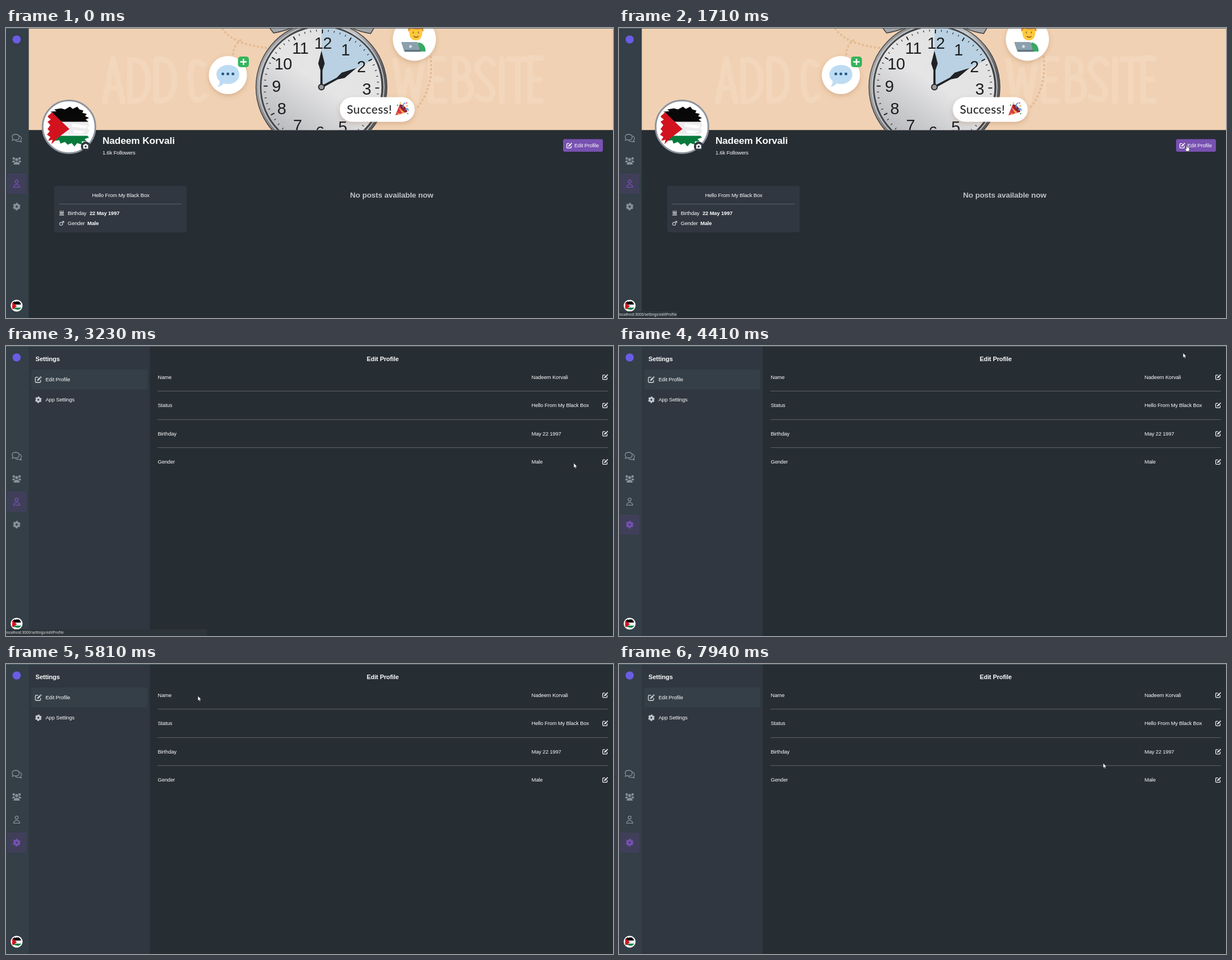
Write an HTML page that moves like this. It is 1082 px wide and 518 px high and loops after 7990 ms.

```html
<!DOCTYPE html>
<html lang="en">
<head>
<meta charset="utf-8">
<title>Edit profile</title>
<style>
  html, body { margin: 0; height: 100%; overflow: hidden; background: #262d33; }
  svg { display: block; width: 100vw; height: 100vh; }
  text { font: 9.4px "Liberation Sans", Arial, sans-serif; letter-spacing: -.13px; fill: #fbfcfc; }
  .bold { font-weight: 700; }
  .mid { text-anchor: middle; }
  .line { fill: none; stroke: currentColor; stroke-linecap: round; stroke-linejoin: round; }
  .solid { fill: currentColor; }
  .rule { stroke: #5c6268; }
  .nav { color: #87919a; }
  .active { color: #7852b5; }
</style>
</head>
<body>
<svg viewBox="0 0 1082 518">
  <defs>
    <clipPath id="bannerClip"><path d="M40 1H1082V182.300H40z"/></clipPath>
    <linearGradient id="metal" x2="1" y2=".35">
      <stop stop-color="#6b6d70"/><stop offset=".12" stop-color="#a7a9ab"/>
      <stop offset=".4" stop-color="#77797c"/><stop offset=".7" stop-color="#c3c4c6"/>
      <stop offset="1" stop-color="#58595c"/>
    </linearGradient>
    <linearGradient id="face" x1=".75" y1=".15" x2=".25" y2=".9">
      <stop stop-color="#e2e2e3"/><stop offset=".45" stop-color="#e5e5e6"/><stop offset="1" stop-color="#bcbdc0"/>
    </linearGradient>
    <filter id="shadow" x="-20%" y="-20%" width="140%" height="150%">
      <feDropShadow dx="0" dy="3" stdDeviation="4" flood-color="#8a5a30" flood-opacity=".28"/>
    </filter>
    <g id="flag">
      <circle r="47" fill="#fff"/>
      <path fill="#ececee" d="M-10-9H33L37-3 33 2 37 7 33 13H-10z"/>
      <path fill="#fff" d="M5-6 33-2 30 3 6 0zM8 6 30 8 22 12 9 11z"/>
      <path fill="#080808" d="M-32-19-37-20-28-25-33-27-22-28-26-31-14-33-7-31 2-36 7-32 15-36 19-31 26-29 24-25 32-23 29-19 36-16 30-13 35-9H-16z"/>
      <path fill="#087a3c" d="M-26 16H33L36 19 28 22 32 26 23 26 24 32 15 29 10 35 5 29-2 32-7 27-15 30-17 24-27 25z"/>
      <path fill="#d3121f" d="M-30-26 1 4-20 20-31 31-29 23-37 25-33 18-39 14-34 8-38 4-33-3-38-9-32-13-38-18z"/>
    </g>
    <g id="edit">
      <path class="line" stroke-width="1.900" d="M-1-5.200H-4.400A2 2 0 0 0-6.400-3.200V4.400A2 2 0 0 0-4.400 6.400H3.200A2 2 0 0 0 5.200 4.400V1.500"/>
      <path class="solid" d="M-2.800 3-2-.3 3-5.300 5.500-2.800.5 2.200zM3.800-6 4.800-7Q5.500-7.500 6.200-6.900L7.200-5.900Q7.700-5.200 7.200-4.500L6.200-3.500z"/>
    </g>
    <g id="gear" class="line" style="stroke-linecap:butt">
      <circle r="3.600" stroke-width="3.400"/>
      <circle r="5.700" stroke-width="2" stroke-dasharray="3.600 2.369" stroke-dashoffset="-1.200"/>
    </g>
    <g id="person" class="line" stroke-width="1.300">
      <circle cy="-3.700" r="2.700"/>
      <path d="M-5.500 6.300C-5.500-.2 5.500-.2 5.500 6.300z"/>
    </g>
  </defs>

  <rect width="1082" height="518" fill="#262d33"/>

  <g id="profile">
    <g clip-path="url(#bannerClip)">
      <path fill="#f1d1b3" d="M40 0H1082V183H40z"/>
      <g class="line" color="#f3d7bc" stroke-width="10">
        <path d="M176 132 191 55 208 131M181 107H204M221 57V131Q254 132 253 93T221 57M268 56V130Q301 132 300 92T268 56M352 66Q327 46 329 95T354 122"/>
        <path d="M694 58 705 132 718 75 730 132 743 55M780 55H757V130H782M757 92H777M800 55V130Q831 132 829 108T800 90Q826 90 824 71T800 55M869 64Q858 48 845 60T852 91T866 122T840 122M884 55V131M896 56H928M912 56V131M954 54H934V130H954M934 92H951"/>
      </g>
      <path class="line" color="#e5bd97" stroke-width="4.500" stroke-dasharray="0 7.200" d="M386 2Q402 22 430 29T486 38M418 22Q404 32 405 52M757 52Q763 105 732 144"/>
      <path fill="#a3a5a8" stroke="#3d3f42" stroke-width="1.500" d="M470 0 477 9Q496 6 513-2zM656 0 650 10Q630 7 612-2z"/>
      <g transform="translate(562.300 105.500)">
        <circle r="117.500" fill="#434548"/><circle r="116" fill="url(#metal)"/>
        <circle r="111.500" fill="none" stroke="#d0d1d3" stroke-width="1.500"/>
        <circle r="109.500" fill="#3f4144"/><circle r="107" fill="url(#face)"/>
        <path fill="#b9d1e2" d="M0 0V-107A107 107 0 0 1 94.500-50.200z"/>
        <g id="dial"></g>
        <g fill="#202226">
          <path d="M-2 0-1.800-30-5.800-42 0-65 5.800-42 1.800-30 2 0z"/>
          <path transform="rotate(61.500)" d="M-2 0-1.800-32-5.500-44 0-71 5.500-44 1.800-32 2 0z"/>
        </g>
        <circle r="5" fill="#999b9d" stroke="#222427" stroke-width="2"/>
      </g>

      <g filter="url(#shadow)" fill="#fff">
        <circle cx="395.500" cy="84" r="34"/>
        <circle cx="728" cy="20" r="38.500"/>
        <rect x="595" y="123.500" width="133.500" height="44" rx="22"/>
      </g>
      <path fill="#bddcf3" d="M396 66C409 66 416 74 416 83S408 100 396 100Q391 100 388 99 384 104 377 105 381 101 381 95 375 90 375 83C375 74 383 66 396 66z"/>
      <g fill="#285b86"><circle cx="386.500" cy="82" r="2.500"/><circle cx="395.500" cy="82" r="2.500"/><circle cx="404.500" cy="82" r="2.500"/></g>
      <rect x="413.500" y="51" width="19.500" height="19" rx="5" fill="#35b45d"/>
      <path stroke="#fff" stroke-width="2.600" d="M417.500 60.500H429M423.300 55V66"/>

      <path fill="#38a862" d="M712 42Q712 25 731 25 748 26 748 42z"/>
      <path fill="#fff" d="M724 24H737L731 32z"/>
      <path fill="#ffc83d" d="M719-4H742V9Q741 22 730.500 22T719 9z"/>
      <path fill="#e58a28" d="M717 7V-5H744V7L740 2Q729 4 722 1z"/>
      <path class="line" color="#6d471e" stroke-width="1.300" d="M726 7V9M735 7V9M727 15Q731 18 735 15"/>
      <path fill="#8ba0ad" d="M705 25H732Q734 25 734.500 27L738 42H710L705 27z"/>
      <path fill="#617583" d="M710 39H739V42.500H711z"/>
      <circle cx="721" cy="33" r="2.500" fill="#d7e1e7"/>

      <text x="607.500" y="152.700" style="font:500 21px Lato,sans-serif;letter-spacing:.35px;fill:#27282b">Success!</text>
      <path fill="#d93a48" d="M694 156 702 136Q713 139 715 150z"/>
      <path fill="#f5b840" d="M696 151 705 154 701 155zM700 142 710 151 706 152z"/>
      <ellipse cx="708.500" cy="143.500" rx="3.500" ry="9" transform="rotate(-43 708.500 143.500)" fill="#8d2334"/>
      <path class="line" color="#4c91d9" stroke-width="1.800" d="M708 142Q707 136 711 134M712 146Q716 142 717 147"/>
      <g fill="#efb53b"><circle cx="703" cy="134" r="1.300"/><circle cx="715" cy="139" r="1.500"/></g>
      <g fill="#5aad62"><circle cx="698" cy="138" r="1.300"/><circle cx="716" cy="153" r="1.300"/></g>
      <circle cx="714" cy="134" r="1.300" fill="#e14d70"/>
    </g>

    <use href="#flag" x="112" y="176.500"/>
    <circle cx="112.300" cy="176.500" r="47" fill="none" stroke="#8d949d" stroke-width="3"/>
    <circle cx="142" cy="211.500" r="8.500" fill="#2d343c"/>
    <path fill="#f2f3f4" d="M137.500 208.500H139.500L140.300 207H143.700L144.500 208.500H146.500V215.500H137.500z"/>
    <circle cx="142" cy="211.800" r="1.800" fill="#2d343c"/>

    <text class="bold" x="172" y="206.500" style="font-size:17.300px">Nadeem Korvali</text>
    <text x="172" y="225.500">1.6k Followers</text>
    <rect x="993" y="198.500" width="71" height="22.500" rx="3" fill="#7851b1"/>
    <use href="#edit" transform="translate(1004 210) scale(.68)" color="#fff"/>
    <text x="1013" y="213">Edit Profile</text>

    <rect x="86" y="282" width="236" height="83" rx="4" fill="#303740"/>
    <text class="mid" x="204.500" y="301.500">Hello From My Black Box</text>
    <path class="rule" stroke="#737980" d="M95 314.500H313"/>
    <g class="line" color="#c5c9cd">
      <path stroke-width="1.200" d="M96.500 326.500V329M99.300 326.500V329M102 326.500V329M95.500 334.500H103"/>
      <path stroke-width="1.700" d="M96.300 330.200H102.300M96.300 332.500H102.300"/>
      <g stroke-width="1.200"><circle cx="98.300" cy="349.800" r="2.700"/><path d="M100.300 347.800 103 345.300M100.700 345.300H103V347.600"/></g>
    </g>
    <text x="110" y="333.700">Birthday</text><text class="bold" x="149" y="333.700">22 May 1997</text>
    <text x="110" y="352.200">Gender</text><text class="bold" x="145" y="352.200">Male</text>
    <text class="bold mid" x="687.500" y="303" style="font-size:13.700px;fill:#bcc0c5">No posts available now</text>
  </g>

  <g id="settings">
    <rect x="40" width="216.500" height="518" fill="#303740"/>
    <rect x="45" y="42" width="207" height="36" rx="4" fill="#343f47"/>
    <text class="bold" x="52.500" y="26.500" style="font-size:11.300px">Settings</text>
    <use href="#edit" transform="translate(57.500 60) scale(.8)" color="#c5cbd0"/>
    <text x="70.500" y="63">Edit Profile</text>
    <use href="#gear" transform="translate(57.700 96) scale(.86)" color="#c5cbd0"/>
    <text x="70.500" y="99.300">App Settings</text>
    <text class="bold mid" x="671.500" y="26.500" style="font-size:11.100px">Edit Profile</text>
    <g id="rows"></g>
  </g>

  <rect width="40.600" height="518" fill="#343f47"/>
  <path fill="#506469" d="M0 0H1082V1H0z"/>
  <circle cx="19" cy="20.500" r="7.300" fill="#6b5ce5"/>
  <g class="nav">
    <path class="line" stroke-width="1.300" d="M17 190C21 190 23.500 192 23.500 195S21 200 17 200L14.500 199.500 11 201 12.500 198Q11 196.500 11 195C11 192 13 190 17 190zM24.500 193Q28 195 27.500 198 27.300 199.500 26 200.500L27.500 203.500 23.500 202.500Q19.500 203 17.500 201.500"/>
    <g class="solid">
      <circle cx="13.800" cy="233" r="2.200"/><circle cx="24.200" cy="233" r="2.200"/><circle cx="19" cy="235" r="2.700"/>
      <path d="M11 240Q11 236 15 236.500L16 238.500 14 240zM27 240Q27 236 23 236.500L22 238.500 24 240zM13.500 244Q13.500 239 19 239T24.500 244z"/>
    </g>
    <use href="#person" x="19" y="278"/>
    <use href="#gear" x="19" y="319"/>
  </g>
  <g id="personActive" class="active">
    <rect x="2" y="260" width="34.500" height="36" rx="4" fill="#403f5a"/><use href="#person" x="19" y="278"/>
  </g>
  <g id="gearActive" class="active">
    <rect x="2" y="301" width="34.500" height="36" rx="4" fill="#403f5a"/><use href="#gear" x="19" y="319"/>
  </g>
  <use href="#flag" transform="translate(19 496) scale(.225)"/>

  <g id="status">
    <rect id="statusBar" y="506" width="104" height="12" fill="#2d353b"/>
    <text y="514.300" style="font:6.400px 'Noto Sans',sans-serif;letter-spacing:0;fill:#e3e6e8">localhost:3000/settings/editProfile</text>
  </g>

  <g id="cursor" stroke="#16191c" stroke-width=".6" fill="#fff" stroke-linejoin="round">
    <path id="arrow" d="M0 0V8.800L2 7 3.400 10 4.800 9.300 3.500 6.500H6.200z"/>
    <path id="hand" d="M-.9 1.200Q0 0 .9 1.200V4Q2 3.500 2.300 4.400 3.300 4 3.600 4.900 4.900 4.700 4.800 6V8.500L3.800 11.300H-.8L-3 7.200Q-2.500 6-.9 7.200z"/>
  </g>
</svg>

<script>
const LOOP = 7990;
const $ = id => document.getElementById(id);

// Clock ticks and numerals
let dial = '';
for (let i = 0; i < 60; i++) {
  const hour = i % 5 === 0;
  dial += `<path stroke="#222" stroke-width="${hour ? 2 : 1.1}" transform="rotate(${i * 6 + 1})" d="M0-103V${hour ? -96 : -99.5}"/>`;
}
for (let n = 1; n <= 12; n++) {
  const angle = (n * 30 + 2) * Math.PI / 180;
  dial += `<text class="mid" x="${80.5 * Math.sin(angle)}" y="${11 - 80 * Math.cos(angle)}" style="font-size:29px;letter-spacing:-.5px;fill:#1c1d1f">${n}</text>`;
}
$('dial').innerHTML = dial;

// Editable fields
const fields = [['Name', 'Nadeem Korvali'], ['Status', 'Hello From My Black Box'], ['Birthday', 'May 22 1997'], ['Gender', 'Male']];
$('rows').innerHTML = fields.map(([label, value], i) => {
  const y = 55.3 + i * 50.5;
  return `<text x="270.500" y="${y + 3.3}">${label}</text><text x="936.800" y="${y + 3.3}">${value}</text>
    <use href="#edit" transform="translate(1068 ${y + .2}) scale(.68)" color="#f1f2f3"/>` +
    (i < 3 ? `<path class="rule" d="M270 ${Math.round(y + 25) + .5}H1073"/>` : '');
}).join('');

// Pointer path: time, x, y
const path = [
  [290, 1060, 497], [640, 1031, 261], [950, 1031, 261], [1450, 1012, 209],
  [3970, 1012, 209], [4150, 915, 130], [4260, 888, 60], [4410, 1005, 12],
  [4560, 1060, 50], [4790, 1060, 197], [5040, 830, 123], [5290, 577, 184],
  [5490, 577, 184], [5810, 342, 57], [5910, 342, 57], [6680, 332, 194],
  [6780, 332, 194], [7230, 588, 187], [7390, 588, 187], [7690, 823, 188],
  [7840, 823, 188], [7940, 863, 177]
];

function pointerAt(t) {
  const next = path.findIndex(p => p[0] > t);
  if (next < 1) return path[next < 0 ? path.length - 1 : 0].slice(1);
  const [t0, x0, y0] = path[next - 1], [t1, x1, y1] = path[next];
  const k = (t - t0) / (t1 - t0);
  return [x0 + (x1 - x0) * k, y0 + (y1 - y0) * k];
}

const ramp = (t, from, to) => Math.min(1, Math.max(0, (t - from) / (to - from)));
const show = (id, on) => $(id).style.display = on ? '' : 'none';

function draw(t) {
  const editing = t >= 3230;
  show('profile', !editing);
  show('settings', editing);

  const swap = ramp(t, 3280, 3390);
  $('personActive').style.opacity = 1 - swap;
  $('gearActive').style.opacity = swap;

  $('status').style.opacity = ramp(t, 1570, 1700) * (1 - ramp(t, 3450, 3650));
  $('statusBar').setAttribute('width', editing ? 358.5 : 104);

  const [x, y] = pointerAt(t);
  const overButton = t < 3030 && y < 221;
  $('cursor').setAttribute('transform', `translate(${x} ${y})`);
  show('cursor', t >= 290);
  show('arrow', !overButton);
  show('hand', overButton);
}

function frame() {
  draw(performance.now() % LOOP);
  requestAnimationFrame(frame);
}
frame();
</script>
</body>
</html>
```
